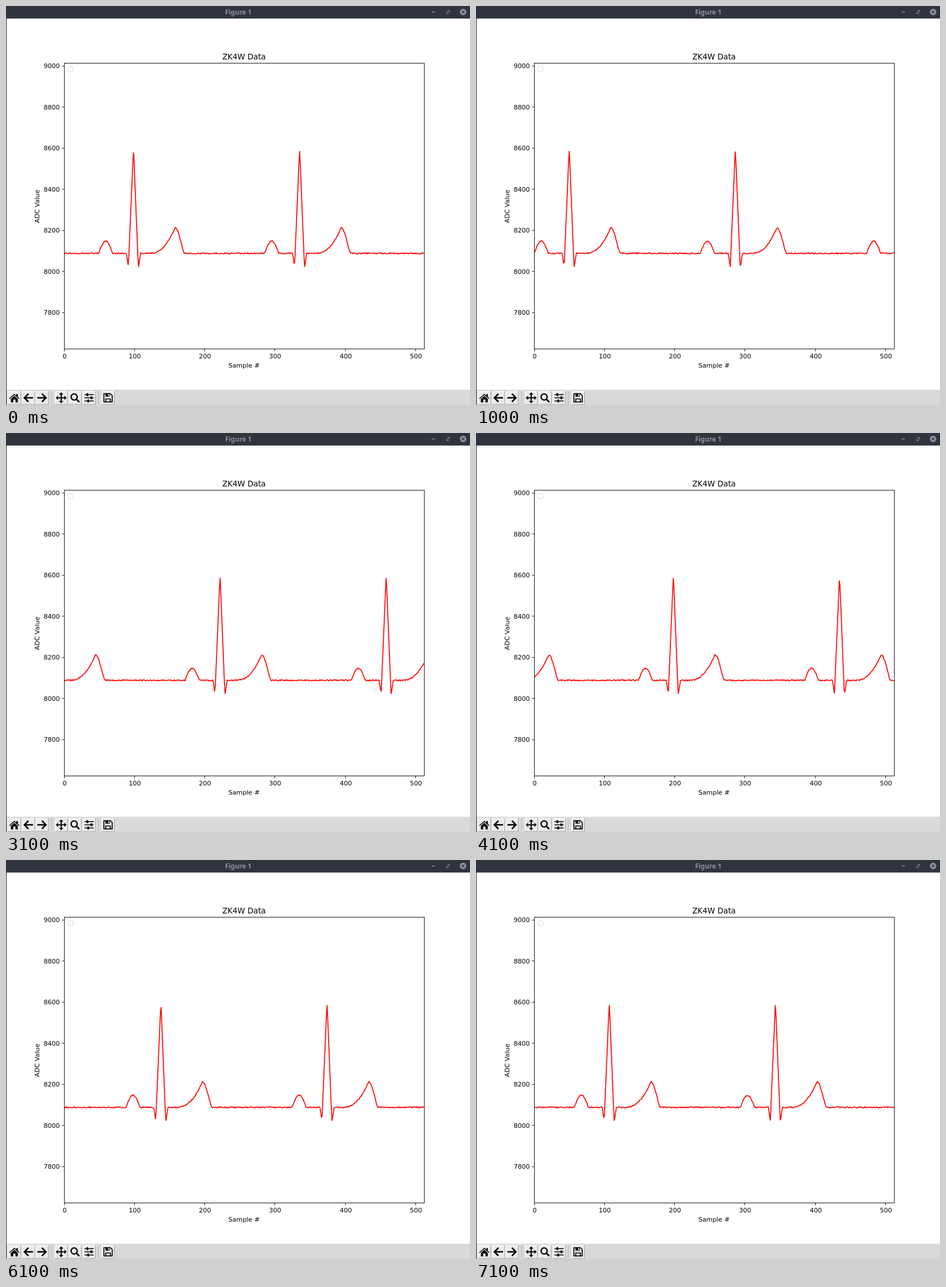
These frames come from a looping animation (807 by 694 pixels, 8 s). An HTML page:

```html
<!DOCTYPE html>
<html lang="en">
<head>
<meta charset="utf-8">
<title>Figure 1</title>
<style>
  html, body { margin: 0; width: 100%; height: 100%; overflow: hidden; background: #fff; }
  svg { display: block; width: 807px; height: 694px; }
  text { font: 11.11px "DejaVu Sans", sans-serif; }
  .mid { text-anchor: middle; }
  .end { text-anchor: end; }
  .title { font-size: 13.33px; }
  .window { font: bold 11.5px "Noto Sans", "Open Sans", sans-serif; fill: #8b919d; }
  .axis { fill: none; stroke: #000; stroke-width: .9; }
  .icon { fill: none; stroke: #000; stroke-width: 2.6; }
</style>
</head>
<body>
<svg viewBox="0 0 807 694">
  <defs>
    <clipPath id="plot"><rect x="101" y="99" width="627" height="498"/></clipPath>
    <g id="button">
      <rect x="-11" y="-11.5" width="22" height="23" fill="#ebebeb"/>
      <path d="M-10.5 11V-11H10.5" fill="none" stroke="#fff"/>
      <path d="M-11 11.5H11V-11" fill="none" stroke="#a6a6a6"/>
    </g>
    <path id="arrow" class="icon" d="M8 0H-6M0 -7L-7 0L0 7"/>
  </defs>

  <rect width="807" height="694" fill="#fff"/>
  <rect width="807" height="21.5" fill="#2f343f"/>
  <rect y="20.5" width="807" height="1" fill="#262a33"/>
  <text class="window mid" x="404" y="14.5">Figure 1</text>
  <g fill="none" stroke="#858a96" stroke-width="1.3">
    <path d="M740.5 10.5h5.5M768 8h3v3M770 13h-3v-3"/>
    <circle cx="795" cy="10.3" r="5.6" fill="#90949e" stroke="none"/>
    <path d="M792.7 8l4.6 4.6m0-4.6l-4.6 4.6" stroke="#2f343f"/>
  </g>

  <text class="mid title" x="414" y="93">ZK4W Data</text>
  <text class="mid" x="414" y="629">Sample #</text>
  <text class="mid" transform="translate(58 348.5) rotate(-90)">ADC Value</text>
  <polyline id="trace" clip-path="url(#plot)" fill="none" stroke="#f00" stroke-width="1.67"
    stroke-linejoin="round" stroke-linecap="square"/>
  <rect x="108" y="105.5" width="8.5" height="8.5" rx="2" fill="#fff" stroke="#d6d6d6" stroke-width=".9"/>
  <rect class="axis" x="101.5" y="99.5" width="626" height="497"/>
  <g id="ticks"></g>

  <rect y="667.5" width="807" height="26.5" fill="#d9d9d9"/>
  <rect y="21" width="1" height="673" fill="#2c2230"/>
  <path d="M79.5 671V692M160.5 671V692" stroke="#b5b5b5"/>
  <g transform="translate(14.5 681.5)"><use href="#button"/>
    <path d="M-9 1L0 -7L3.5 -4V-6.5H6V-2L9 1L8 2L0 -5L-8 2Z"/>
    <path d="M-6 2L0 -3.5L6 2V8H2V3H-2V8H-6Z"/></g>
  <g transform="translate(39 681.5)"><use href="#button"/><use href="#arrow"/></g>
  <g transform="translate(62.5 681.5)"><use href="#button"/><use href="#arrow" transform="scale(-1 1)"/></g>
  <g transform="translate(96 681.5)"><use href="#button"/>
    <path class="icon" d="M-7 0H7M0 -7V7" style="stroke-width:2"/>
    <path d="M0 -9.5L3.8 -5.5H-3.8ZM0 9.5L3.8 5.5H-3.8ZM-9.5 0L-5.5 -3.8V3.8ZM9.5 0L5.5 -3.8V3.8Z"/></g>
  <g transform="translate(120 681.5)"><use href="#button"/>
    <circle class="icon" cx="-1.5" cy="-1.5" r="5.3" style="stroke-width:2.3"/>
    <path class="icon" d="M2.5 2.5L7.5 7.5"/></g>
  <g transform="translate(144.5 681.5)"><use href="#button"/>
    <path class="icon" d="M-8 -5.5H8M-8 0H8M-8 5.5H8" style="stroke-width:1.6"/>
    <path d="M-4.5 -8h3v5h-3zM2.5 -2.5h3v5h-3zM-3 3h3v5h-3z"/></g>
  <g transform="translate(177.5 681.5)"><use href="#button"/>
    <path class="icon" d="M-7.2 -7.2H4L7.2 -4V7.2H-7.2ZM-4 7V2H4V7" style="stroke-width:1.7"/>
    <path d="M-4.5 -7.5H3V-2H-4.5Z"/><path d="M0 -6.5H2V-3H0Z" fill="#ebebeb"/></g>
</svg>
<script>
// First visible sample after each redraw
const starts = [0, 285, 561, 822, 1082, 1348, 1615, 1882];
const redrawTime = n => n * 1000 + (n > 1 ? 100 : 0);

const period = 236.28, firstPeak = 98.7, lead = 60, baseline = 8088.5;
const axes = { left: 101, width: 626.2, top: 99.5, height: 497 };
const ticks = document.getElementById("ticks");
const trace = document.getElementById("trace");

const noise = i => {
  const h = Math.sin(i * 12.9898 + 4.1) * 43758.5453;
  return (h - Math.floor(h) - .5) * 6;
};

// Quarter cosine, 1 at x = 0 and 0 from x = 1 on
const arch = x => Math.cos(Math.min(1, Math.abs(x)) * Math.PI / 2);

// Steep triangle with a flattened tip and a shallow dip on each side
function spike(d) {
  const x = Math.abs(d);
  const flank = 515 - (d < 0 ? 80 : 85) * x;
  const recovery = 24 * (x - 10);
  return Math.min(496, Math.max(flank, recovery, -64));
}

// Height above the baseline, d samples from the peak of a heartbeat
function beat(d) {
  if (Math.abs(d) < 10) return spike(d);
  if (d < 0) return 59 * arch((d + 39.7) / 10);
  if (d < 22) return 0;
  return 124 * (d < 59 ? ((d - 22) / 37) ** 2.4 : arch((d - 59) / 13.4) ** 1.3);
}

function sample(i) {
  const shifted = i - firstPeak + lead;
  const d = shifted - Math.floor(shifted / period) * period - lead;
  return baseline + beat(d) + (Math.abs(d) < 10 ? 0 : noise(i));
}

const tick = (path, cls, x, y, label) =>
  `<path class="axis" d="${path}"/><text class="${cls}" x="${x}" y="${y}">${label}</text>`;

function draw(start) {
  const values = Array.from({ length: 512 }, (_, i) => sample(start + i));
  const bottom = Math.min(...values) * .95, top = Math.max(...values) * 1.05;
  const toX = i => axes.left + i / 512 * axes.width;
  const toY = v => axes.top + (top - v) / (top - bottom) * axes.height;

  let marks = "";
  for (let i = 0; i <= 500; i += 100) {
    const x = Math.floor(toX(i)) + .5;
    marks += tick(`M${x} 597v3.5`, "mid", x + .5, 613, i);
  }
  for (let v = 7800; v <= 9000; v += 200) {
    const y = Math.floor(toY(v)) + .5;
    marks += tick(`M101 ${y}h-3.5`, "end", 93.7, Math.round(toY(v) + 4), v);
  }
  ticks.innerHTML = marks;
  trace.setAttribute("points", values.map((v, i) => `${toX(i).toFixed(2)},${toY(v).toFixed(2)}`).join(" "));
}

let shown;
function frame() {
  const time = performance.now() % 8000;
  const start = starts.findLast((_, n) => redrawTime(n) <= time);
  if (start !== shown) draw(shown = start);
  requestAnimationFrame(frame);
}
frame();
</script>
</body>
</html>
```
